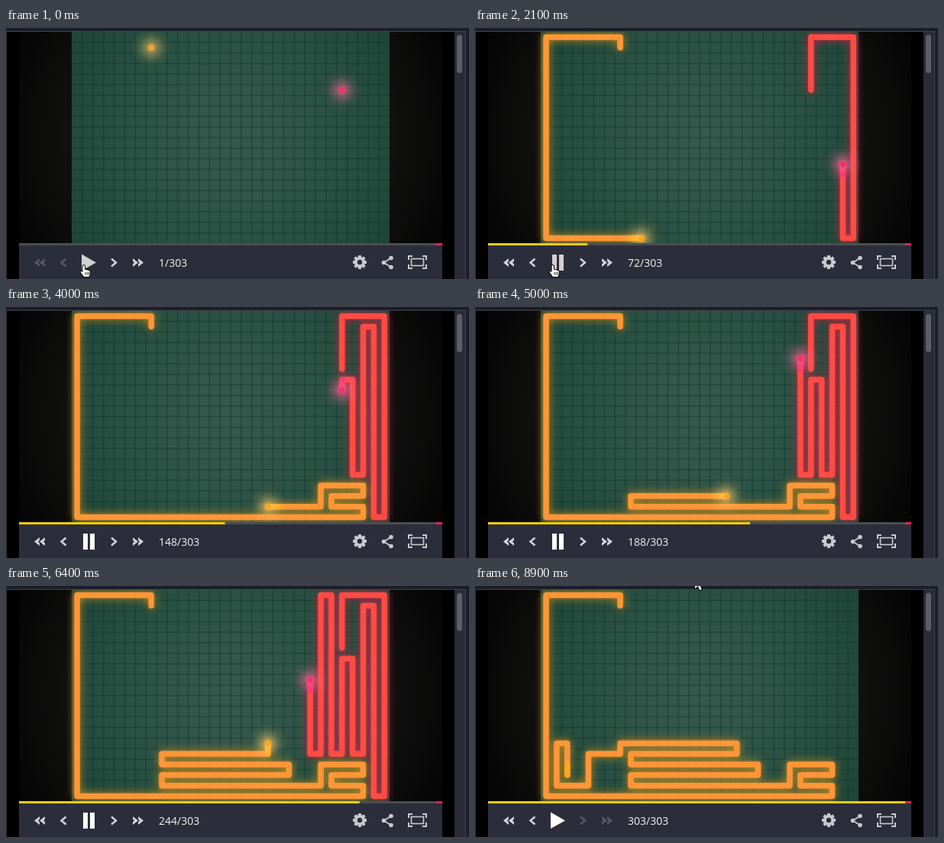
Animation of 606 by 329 pixels, one loop 9200 ms. Source, as an HTML page with a canvas:

```html
<!DOCTYPE html>
<html lang="en">
<head>
<meta charset="utf-8">
<title>Light trails replay</title>
<style>
html, body { margin: 0; width: 100%; height: 100%; overflow: hidden; background: #000; }
canvas { display: block; }
</style>
</head>
<body>
<canvas id="stage" width="606" height="329"></canvas>
<script>
const ctx = document.getElementById('stage').getContext('2d');
const LOOP = 9200, LAST = 303;
const VIEW = { x: 17, y: 5, w: 554, h: 277 };
const BOARD = { x: 86, y: 5, w: 416, h: 277 };
const CELL = 13.87;
const cellX = i => 93 + i * CELL;
const cellY = j => 12 + j * CELL;

// Expands "U2 L1" style runs into one point per move.
function route(i, j, runs) {
  const step = { U: [0, -1], D: [0, 1], L: [-1, 0], R: [1, 0] };
  const pts = [[cellX(i), cellY(j)]];
  for (const run of runs.split(' ')) {
    const [dx, dy] = step[run[0]];
    for (let k = +run.slice(1); k > 0; k--) {
      i += dx;
      j += dy;
      pts.push([cellX(i), cellY(j)]);
    }
  }
  return pts;
}

const orange = {
  pts: route(7, 1, 'U1 L7 D19 R27 U1 L3 U1 R3 U1 L4 D2 L15 U1 R12 U1 L12 U1 R10 U1 L11 D1 L3 D3 L3 U4 R1 D3'),
  trail: '#ff9638', head: '#ffa51e', glow: '255,165,25', halo: '255,205,110'
};
const red = {
  pts: route(25, 5, 'U5 R4 D19 L1 U18 L1 D14 L1 U9 L1 D9 L1 U15 L1 D15 L1 U15 L1 D17'),
  trail: '#ff4b45', head: '#ff2f62', glow: '255,35,75', halo: '255,110,160'
};

function rect(x, y, w, h, fill) {
  ctx.fillStyle = fill;
  ctx.fillRect(x, y, w, h);
}

function radial(x, y, r, ...stops) {
  const g = ctx.createRadialGradient(x, y, 0, x, y, r);
  stops.forEach((c, k) => g.addColorStop(k / (stops.length - 1), c));
  return g;
}

function trace(pts) {
  ctx.beginPath();
  pts.forEach(([x, y], k) => k ? ctx.lineTo(x, y) : ctx.moveTo(x, y));
}

function poly(pts, fill) {
  trace(pts);
  ctx.closePath();
  ctx.fillStyle = fill;
  ctx.fill();
}

function line(pts, color, width) {
  trace(pts);
  ctx.strokeStyle = color;
  ctx.lineWidth = width;
  ctx.stroke();
}

function drawBoard() {
  rect(VIEW.x, VIEW.y, VIEW.w, VIEW.h, radial(294, 144, 310, '#22221f', '#1b1b18', '#111110', '#040404'));
  rect(BOARD.x, BOARD.y, BOARD.w, BOARD.h, radial(294, 144, 255, '#38594d', '#315649', '#274e40', '#1d4436'));
  for (let i = 1; i < 30; i++) rect(BOARD.x + i * CELL - 1, BOARD.y, 2, BOARD.h, 'rgba(18,54,43,.36)');
  for (let j = 1; j < 20; j++) rect(BOARD.x, BOARD.y + j * CELL - 1, BOARD.w, 2, 'rgba(18,54,43,.36)');
}

function drawRider(p, moves, alpha, haloAlpha) {
  if (alpha <= 0) return;
  const done = p.pts.slice(0, moves + 1);
  const [x, y] = done[done.length - 1];
  ctx.save();
  ctx.globalAlpha = alpha;
  ctx.lineCap = ctx.lineJoin = 'round';
  if (moves) {
    ctx.shadowColor = `rgba(${p.glow},.85)`;
    ctx.shadowBlur = 11;
    line(done, p.trail, 7.5);
    ctx.shadowBlur = 0;
    line(done.slice(-2), p.head, 7.5);
  }
  ctx.globalAlpha = alpha * haloAlpha;
  rect(x - 27, y - 27, 54, 54, radial(x, y, 26,
    `rgba(${p.halo},.75)`, `rgba(${p.halo},.36)`, `rgba(${p.halo},.1)`, `rgba(${p.halo},0)`));
  ctx.globalAlpha = alpha;
  ctx.beginPath();
  ctx.arc(x, y, 3.8, 0, 7);
  ctx.fillStyle = p.head;
  ctx.fill();
  ctx.restore();
}

function chevron(x, dir, color, solid) {
  const w = solid ? 7 : 6;
  const tip = x + dir * w;
  if (solid) poly([[x, 302], [tip, 307.5], [x, 313], [x, 309.6], [x + dir * 2, 307.5], [x, 305.4]], color);
  else line([[x, 302.5], [tip, 307.5], [x, 312.5]], color, 2.4);
}

function drawGear(x, y) {
  ctx.fillStyle = '#c9cad0';
  ctx.save();
  ctx.translate(x, y);
  for (let k = 0; k < 8; k++) {
    ctx.fillRect(-2, -9, 4, 5);
    ctx.rotate(Math.PI / 4);
  }
  ctx.restore();
  ctx.beginPath();
  ctx.arc(x, y, 5.2, 0, 7);
  ctx.strokeStyle = '#c9cad0';
  ctx.lineWidth = 4;
  ctx.stroke();
}

function drawTools() {
  const c = '#c9cad0';
  drawGear(463, 307);
  line([[504, 301.5], [494.5, 307.5], [504, 313.5]], c, 1.8);
  for (const [x, y] of [[504, 301.5], [494.5, 307.5], [504, 313.5]]) {
    ctx.beginPath();
    ctx.arc(x, y, 2.8, 0, 7);
    ctx.fillStyle = c;
    ctx.fill();
  }
  for (const [x, dx] of [[527, 1], [550, -1]])
    for (const [y, dy] of [[299, 1], [315, -1]])
      line([[x + dx * 5, y], [x, y], [x, y + dy * 5]], c, 2);
  ctx.lineWidth = 1.6;
  ctx.strokeRect(530.5, 302.5, 16, 9);
}

function drawControls(n, playing, hover) {
  const on = '#d4d5da', off = '#565963';
  rect(17, 285, 554, 44, '#2b2e3a');
  rect(17, 282, 554, 3, '#4b4d52');
  rect(17, 282, (n - 1) / (LAST - 1) * 554, 3, '#f3cb0c');
  rect(563, 282, 8, 3, '#ee1f50');

  const back = n > 1 ? on : off;
  const next = playing || n < LAST ? on : off;
  chevron(44, -1, back, true);
  chevron(51, -1, back, true);
  chevron(78.5, -1, back);
  chevron(138, 1, next);
  chevron(166, 1, next, true);
  chevron(173, 1, next, true);

  const main = hover ? '#d0d0d2' : '#fff';
  if (playing) {
    rect(101, 297, 6, 21, main);
    rect(110, 297, 6, 21, main);
  } else {
    poly([[99, 296.5], [118, 307.5], [99, 318]], main);
  }
  ctx.fillStyle = '#f4f4f6';
  ctx.font = '14px "Open Sans", sans-serif';
  ctx.fillText(n + '/' + LAST, 200, 313);
  drawTools();
}

function drawShape(d, x, y) {
  const path = new Path2D(d);
  ctx.save();
  ctx.translate(x, y);
  ctx.lineJoin = 'round';
  ctx.strokeStyle = '#000';
  ctx.lineWidth = 2;
  ctx.stroke(path);
  ctx.fillStyle = '#fff';
  ctx.fill(path);
  ctx.restore();
}

function drawHand() {
  drawShape('M4 1Q5.5 0 6 1.5V6L11 7.2Q13 7.7 13 9.5V12L11.5 15.5H5L1 10Q.2 8.5 1.5 8.2L3.5 9.5V1.8Z', 97, 310.5);
  for (const x of [103.5, 105.8, 108]) rect(x, 320, 1, 3.5, '#222');
}

function drawFrame() {
  rect(0, 0, 606, 329, '#1b1e29');
  rect(0, 4, 602, 1, '#41444f');
  rect(0, 5, 1, 324, '#343741');
  rect(1, 5, 586, 324, '#000');
  rect(587, 5, 14, 324, '#292c37');
  rect(601, 5, 1, 324, '#41444f');
  ctx.beginPath();
  ctx.roundRect(590, 9, 7, 50, 3.5);
  ctx.fillStyle = '#5c5e68';
  ctx.fill();
}

function turnAt(tick) {
  if (tick < 4) return 1;
  if (tick <= 78) return 4 * (tick - 3);
  return Math.min(LAST, 300 + Math.max(0, tick - 80));
}

function draw(t) {
  const tick = Math.floor(t / 100);
  const n = turnAt(tick);
  const moves = Math.floor(n / 2);
  const fade = Math.max(0, Math.min(1, (84 - tick) / 4));
  const hover = tick < 25;

  drawFrame();
  ctx.save();
  ctx.beginPath();
  ctx.rect(VIEW.x, VIEW.y, VIEW.w, VIEW.h);
  ctx.clip();
  drawBoard();
  drawRider(red, Math.min(moves, red.pts.length - 1), fade, 1);
  drawRider(orange, Math.min(moves, orange.pts.length - 1), 1, fade);
  ctx.restore();

  drawControls(n, tick >= 4 && tick < 84, hover);
  if (hover) drawHand();
  if (tick >= 89) drawShape('M0 0V16L3.8 12.6 6.2 18 8.8 17 6.4 11.6H11Z', 288, -12.5);
}

const start = performance.now();
function loop() {
  draw((performance.now() - start) % LOOP);
  requestAnimationFrame(loop);
}
loop();
</script>
</body>
</html>
```
